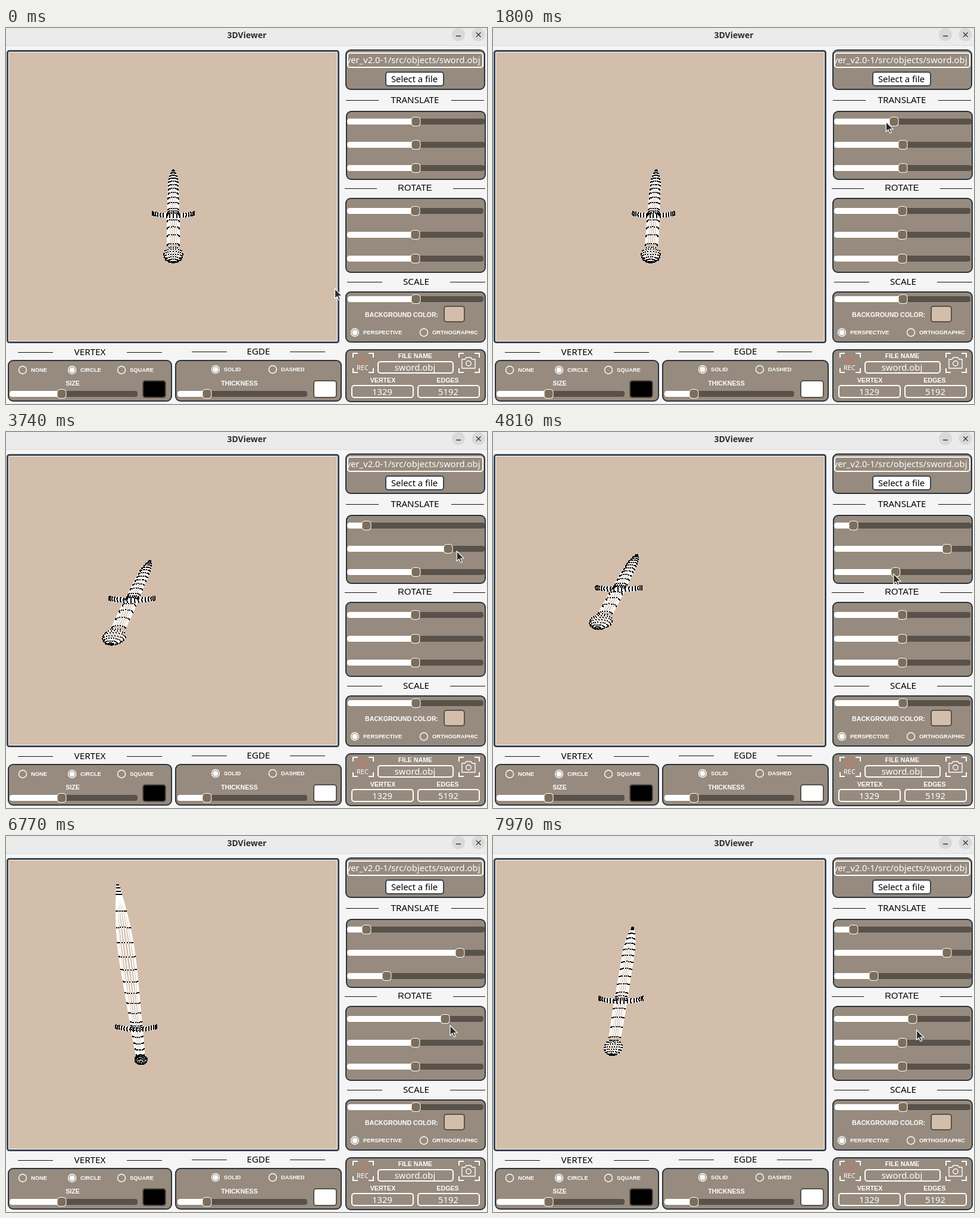
An HTML page with a canvas that plays this animation: 808 by 631 pixels, repeating every 8 s.

```html
<!DOCTYPE html>
<html lang="en">
<head>
<meta charset="utf-8">
<title>3DViewer</title>
<style>
html, body { margin: 0; width: 100%; height: 100%; overflow: hidden; background: #f6f5f5; }
svg, canvas { position: absolute; left: 0; top: 0; }
text { font: 15.2px "Noto Sans", "Open Sans", sans-serif; }
.title { font: bold 14px "Open Sans", sans-serif; fill: #2e2e2e; }
.alt { font: 14.67px "Liberation Sans", Arial, sans-serif; }
.m { text-anchor: middle; }
.w { fill: #fff; }
.n { font-size: 14.8px; }
.b { font: bold 10.67px "Liberation Sans", Arial, sans-serif; fill: #fff; }
.s { font-size: 9.33px; }
.rec { font-size: 11px; }
.line { fill: none; stroke: #fff; stroke-width: 1.4; }
</style>
</head>
<body>
<svg id="ui" width="808" height="631" viewBox="0 0 808 631"></svg>
<canvas id="view" width="808" height="631"></canvas>
<script>
const LOOP = 8000, STEP = 200 / 3, LAG = 75;
const CX = 281, CY = 283, FOCAL = 232, DIST = 281, TILT = 33;

// ---- static interface ----
const frame = (x, y, x2, y2, r, fill, stroke, w = 2) =>
  `<rect x="${x + w / 2}" y="${y + w / 2}" width="${x2 - x - w}" height="${y2 - y - w}" rx="${r}"
    fill="${fill}" stroke="${stroke}" stroke-width="${w}"/>`;
const panel = (x, y, x2, y2) => frame(x, y, x2, y2, 8, '#968b7e', '#2b333b');
const field = (x, y, x2, y2) => frame(x, y, x2, y2, 4, 'none', '#fff');
const swatch = (x, y, fill, w, h) => frame(x, y, x + w, y + h, 4, fill, '#58524a');
const text = (x, y, str, cls = '', attrs = '') =>
  `<text x="${x}" y="${y}" class="${cls}" ${attrs}>${str}</text>`;
const heading = (x, y, str, gap, len, cls = '', rise = 4.5) => text(x, y, str, 'm ' + cls) +
  `<path d="M${x - gap - len} ${y - rise}h${len}m${2 * gap} 0h${len}" stroke="#111"/>`;
const radio = (x, y, label, on) =>
  `<circle cx="${x}" cy="${y}" r="6.5" class="line"/>` +
  (on ? `<circle cx="${x}" cy="${y}" r="4.6" class="w"/>` : '') + text(x + 14, y + 3.2, label, 'b s');
const brackets = x => `<path class="line" style="stroke-width:2"
  d="M${x} 553v-7h8m18 0h8v7m0 18v7h-8m-18 0h-8v-7"/>`;

ui.innerHTML = [
  '<path d="M0 0h808v29H0z" fill="#ebebeb"/><path d="M0 29.5h808" stroke="#dadada"/>',
  text(404.5, 17, '3DViewer', 'm title'),
  '<g fill="#d9d9d9"><circle cx="760" cy="11" r="11"/><circle cx="793.5" cy="11" r="11"/></g>',
  '<path d="M756 13.5h8M790 7.5l7.5 7.5m0 -7.5l-7.5 7.5" stroke="#333" stroke-width="1.3"/>',
  frame(1, 37, 560, 529, 3, '#d3beab', '#3a4653', 3), frame(4, 40, 557, 526, 1, 'none', '#fff', 1),

  panel(570, 36, 805, 104), field(573, 41, 802, 67),
  '<clipPath id="clip"><path d="M575 42h226v24h-226z"/></clipPath>',
  text(796.5, 59, 'ver_v2.0-1/src/objects/sword.obj', 'w n', 'clip-path="url(#clip)" text-anchor="end"'),
  frame(637, 73, 736, 98, 4, '#fff', '#3a4653'), text(686, 91, 'Select a file', 'm n'),

  heading(687, 126, 'TRANSLATE', 61, 55), panel(571, 139, 806, 255),
  heading(687, 273, 'ROTATE', 64, 54, 'alt', 3.5), panel(570, 285, 806, 411),
  heading(689, 431, 'SCALE', 57, 59), panel(570, 442, 806, 528),
  text(603, 485, 'BACKGROUND COLOR:', 'b'), swatch(735, 466, '#d3beab', 36, 28),
  radio(586, 511, 'PERSPECTIVE', true), radio(702, 511, 'ORTHOGRAPHIC'),

  heading(141, 549, 'VERTEX', 62, 59), panel(3, 557, 279, 627),
  radio(28, 574, 'NONE'), radio(111, 574, 'CIRCLE', true), radio(194, 574, 'SQUARE'),
  text(112, 600, 'SIZE', 'b m'), swatch(229, 591, '#000', 40, 30),

  heading(424, 548, 'EGDE', 53, 59), panel(284, 557, 564, 627),
  radio(352, 573, 'SOLID', true), radio(448, 573, 'DASHED'),
  text(392, 600, 'THICKNESS', 'b m'), swatch(516, 591, '#fff', 40, 30),

  panel(570, 539, 806, 628), brackets(583), brackets(761),
  '<circle cx="599" cy="556" r="6" fill="none" stroke="#e0705a" stroke-width="1.5"/>',
  text(599, 574, 'REC', 'm w rec'),
  '<path class="line" d="M766 556h5l2-3h8l2 3h5v15h-22z"/><circle class="line" cx="777" cy="563" r="4.2"/>',
  text(687.5, 554, 'FILE NAME', 'b m'), field(624, 559, 752, 580), text(687, 575, 'sword.obj', 'm w n'),
  text(633, 595, 'VERTEX', 'b m'), field(580, 599, 685, 621), text(632, 616, '1329', 'm w n'),
  text(742, 595, 'EDGES', 'b m'), field(691, 599, 796, 621), text(743, 616, '5192', 'm w n')
].join('');

// ---- motion: stops of the pointer as [time, x, y]; dragged knobs follow it ----
const stops = [
  [140, 552, 437], [930, 651, 225], [1460, 692, 158],
  [1660, 692, 158], [2020, 609, 155], [2400, 609, 155],
  [3130, 691, 194], [3270, 692, 196], [3800, 766, 200], [4060, 766, 200],
  [4600, 692, 236], [5100, 643, 240], [5280, 643, 240], [5630, 665, 276],
  [5970, 692, 307], [6130, 692, 307], [6700, 741, 317], [6900, 750, 318], [7000, 750, 318],
  [7700, 709, 309], [7840, 709, 309], [7970, 711, 325]
];

function pointer(t) {
  const i = stops.findIndex(s => s[0] > t);
  if (i < 1) return stops.at(i).slice(1);
  const [t0, x0, y0] = stops[i - 1], [t1, x1, y1] = stops[i];
  const u = (t - t0) / (t1 - t0);
  return [x0 + (x1 - x0) * u, y0 + (y1 - y0) * u];
}

// Knob shift for a drag that lasts between two times.
const drag = (t, from, to) => pointer(Math.min(Math.max(t - LAG, from), to))[0] - 692;

// ---- sword wireframe: x across, y towards the viewer, z along the blade from the guard ----
const verts = [], edges = [];

// place(section, cos, sin) gives [x, y, z, normalY, normalZ]
function loft(sections, n, place) {
  sections.forEach((s, i) => {
    for (let j = 0; j < n; j++) {
      const id = verts.length, a = (j + .5) / n * 2 * Math.PI;
      verts.push(place(s, Math.cos(a), Math.sin(a)));
      edges.push([id, j < n - 1 ? id + 1 : id + 1 - n]);
      if (i) edges.push([id, id - n]);
    }
  });
}
const range = (n, from, to) => Array.from({length: n}, (_, i) => from + (to - from) * i / (n - 1));
const bladeWidth = z => z < 105 ? 9.5 + 1.8 * z / 105 : 11.3 * (1 - ((z - 105) / 97) ** 2.4);

loft([4, 8, ...range(10, 15, 173.5), ...range(4, 190, 199)], 18, (z, c, s) => {
  const w = bladeWidth(z);
  return [w * c, w * .3 * s, z, s, 0];
});
loft(range(5, 0, -60), 18, (z, c, s) => {
  const w = 10 + z / 30;
  return [w * c, w * .4 * s, z, s, 0];
});
loft(range(9, .4, 2.9), 22, (u, c, s) => {
  const w = 12 * Math.sin(u);
  return [w * c, w * .5 * s, -73 + 11 * Math.cos(u), s * Math.sin(u), Math.cos(u)];
});
loft(range(17, -1.2, 1.2), 12, (u, c, s) => {
  const x = 38 * Math.sin(u);
  return [x, 3.2 * s, 3.2 * c + 6 * (x / 36) ** 2 - 1, s, c];
});

// ---- drawing ----
const g = view.getContext('2d');

function sword(tx, ty, tz, degrees) {
  const a = (TILT + degrees) * Math.PI / 180, cos = Math.cos(a), sin = Math.sin(a);
  const pts = verts.map(([x, y, z, ny, nz]) => {
    y += ty;
    z += tz - 57.5;
    const k = FOCAL / (DIST + z * cos - y * sin);
    return [CX + (x + tx) * k, CY - (y * cos + z * sin) * k, ny * sin - nz * cos > -.1];
  });
  g.beginPath();
  for (const [i, j] of edges) {
    if (!pts[i][2] || !pts[j][2]) continue;
    g.moveTo(pts[i][0], pts[i][1]);
    g.lineTo(pts[j][0], pts[j][1]);
  }
  g.strokeStyle = '#fff';
  g.lineWidth = 2;
  g.stroke();
  g.fillStyle = '#000';
  for (const [x, y, front] of pts) if (front) g.fillRect(Math.round(x - 1), Math.round(y - 1), 2, 2);
}

function box(x, y, w, h, r, fill) {
  g.beginPath();
  g.roundRect(x, y, w, h, r);
  g.fillStyle = fill;
  g.fill();
}

function slider(x, x2, y, knob) {
  box(x, y - 5, x2 - x, 10, 4, '#58524a');
  box(x, y - 5, knob - x, 10, 4, '#fff');
  box(knob - 8, y - 8, 16, 16, 5.5, '#fff');
  box(knob - 7, y - 7, 14, 14, 4.5, '#7b6e5c');
}

function arrow(x, y) {
  g.beginPath();
  [[0, 0], [0, 16.5], [3.8, 13.2], [6.6, 19.2], [9.2, 18], [6.6, 12.2], [11.8, 12]]
    .forEach(([dx, dy]) => g.lineTo(x + dx + .5, y + dy + .5));
  g.closePath();
  g.fillStyle = '#2b2b2b';
  g.strokeStyle = '#fff';
  g.lineWidth = 1.2;
  g.fill();
  g.stroke();
}

function draw(now) {
  const t = Math.floor((now % LOOP + 30) / STEP) * STEP;
  const move = [drag(t, 1660, 2400), drag(t, 3270, 4000), drag(t, 4600, 5280)];
  const turn = [drag(t, 6130, 7800), 0, 0];
  g.clearRect(0, 0, 808, 631);
  sword(move[0] * .77, move[1] * .712, move[2] * -.712, turn[0] * 1.635);
  move.forEach((d, i) => slider(573, 804, 157 + 39 * i, 688.5 + d));
  turn.forEach((d, i) => slider(573, 802, 307 + 40 * i, 687.5 + d));
  slider(574, 802, 455, 688.5);
  slider(6, 221, 614, 93.5);
  slider(288, 506, 614, 337.5);
  arrow(...pointer(t));
  requestAnimationFrame(draw);
}
requestAnimationFrame(draw);
</script>
</body>
</html>
```
